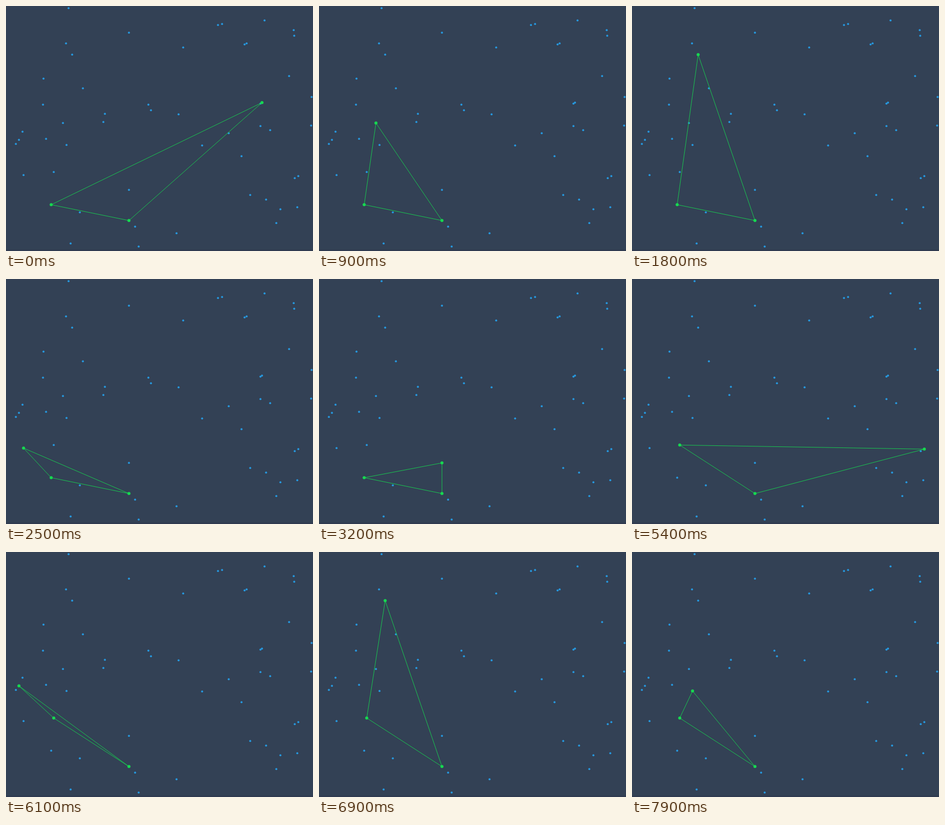
These frames come from a looping animation (600x480 px, 8 s). An HTML page with a canvas:

```html
<!DOCTYPE html>
<html lang="en">
<head>
<meta charset="utf-8">
<title>Triangle search</title>
<style>
html, body { margin: 0; width: 100%; height: 100%; overflow: hidden; background: #334155; }
canvas { display: block; }
</style>
</head>
<body>
<canvas id="stage" width="600" height="480"></canvas>
<script>
const ctx = document.getElementById('stage').getContext('2d');
const STEP = 100, STEPS = 80, START = 14;
const GREEN = '#16d850', BLUE = '#2698de';

const points = [
  [240, 420], [88, 389], [93, 325], [422, 35], [126, 465], [596, 234], [283, 204],
  [414, 37], [278, 193], [553, 137], [32, 246], [252, 432], [78, 260], [460, 294],
  [144, 404], [569, 394], [500, 189], [528, 425], [563, 58], [571, 333], [72, 193],
  [477, 370], [193, 211], [497, 235], [383, 273], [111, 229], [25, 262], [466, 75],
  [562, 47], [259, 471], [508, 379], [240, 52], [190, 227], [536, 398], [129, 95],
  [333, 445], [346, 81], [564, 337], [150, 161], [19, 270], [435, 249], [34, 331],
  [337, 212], [497, 191], [118, 272], [122, 4], [597, 178], [505, 28], [240, 360],
  [73, 142], [470, 73], [516, 243], [117, 73]
];

// Walk the ordered triples (0, j, k) with all indices different.
function triple(step) {
  const n = step + START, run = points.length - 2;
  const j = 1 + Math.floor(n / run);
  let k = 1 + n % run;
  if (k >= j) k++;
  return [points[0], points[j], points[k]];
}

function dot([x, y], r, color) {
  ctx.fillStyle = color;
  ctx.beginPath();
  ctx.arc(x, y, r, 0, Math.PI * 2);
  ctx.fill();
}

function draw(step) {
  ctx.setTransform(1, 0, 0, 1, 0, 0);
  ctx.fillStyle = '#334155';
  ctx.fillRect(0, 0, 600, 480);
  ctx.fillStyle = '#2f3b50';
  ctx.fillRect(0, 477, 600, 3);
  ctx.translate(0.3, 0.3);

  for (const p of points) dot(p, 2, BLUE);

  const tri = triple(step);
  ctx.strokeStyle = GREEN;
  ctx.lineWidth = 0.9;
  ctx.miterLimit = 20;
  ctx.beginPath();
  for (const [x, y] of tri) ctx.lineTo(x, y);
  ctx.closePath();
  ctx.stroke();
  for (const p of tri) dot(p, 3, GREEN);
}

const t0 = performance.now();
function tick() {
  const t = Math.max(0, performance.now() - t0);
  draw(Math.floor(t / STEP) % STEPS);
  requestAnimationFrame(tick);
}
tick();
</script>
</body>
</html>
```
